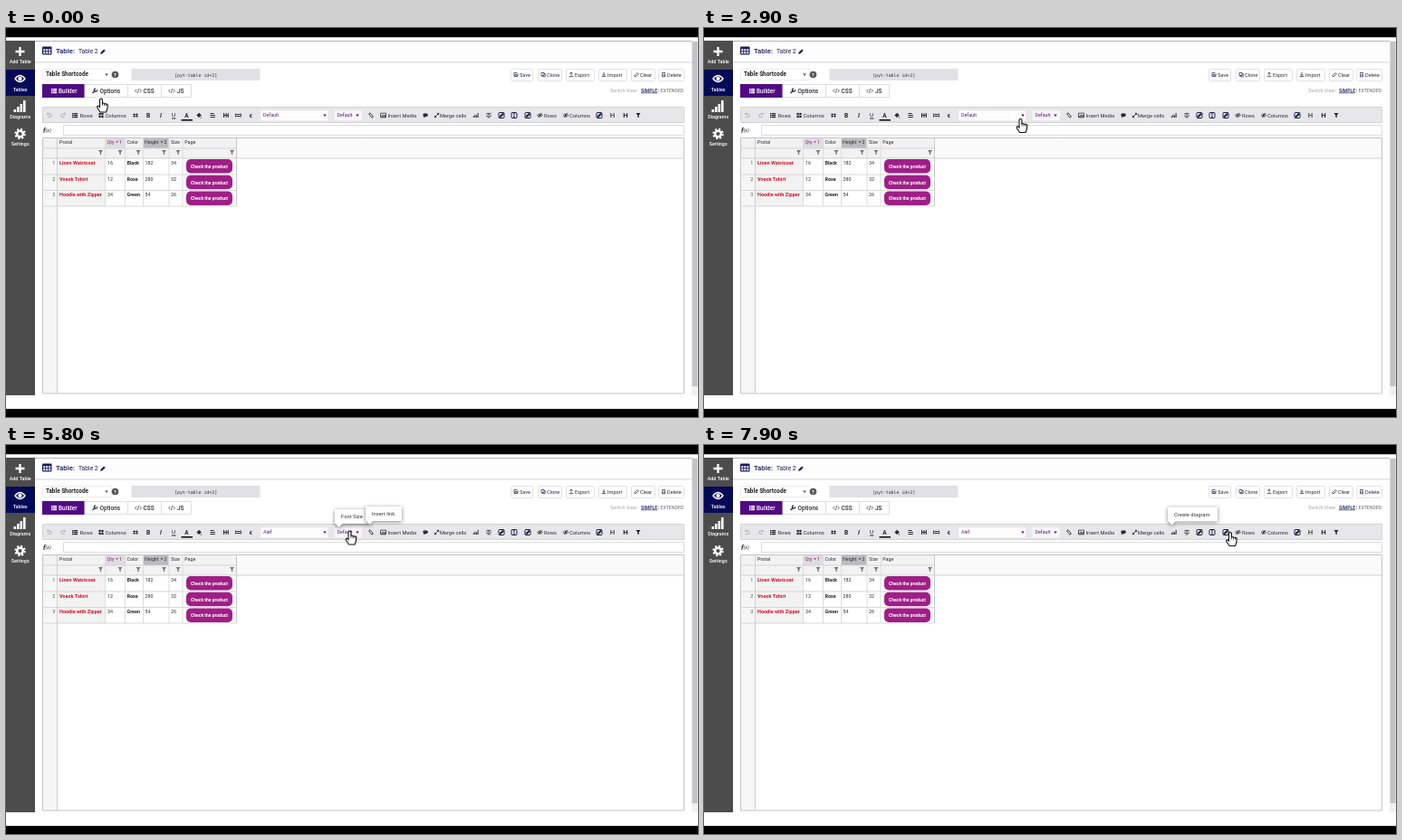
An HTML page with a canvas for the animation above (8 s loop, 764x430 px).

```html
<!DOCTYPE html>
<html lang="en">
<head>
<meta charset="utf-8">
<title>Table builder</title>
<style>
html, body { margin: 0; width: 100%; height: 100%; overflow: hidden; background: #fff; }
canvas { display: block; width: 764px; height: 430px; }
</style>
</head>
<body>
<canvas id="stage"></canvas>
<script>
const W = 764, H = 430, LOOP = 8000;
const canvas = document.getElementById('stage');
const scale = window.devicePixelRatio || 1;
canvas.width = W * scale;
canvas.height = H * scale;

const NAVY = '#1c1f5c', INK = '#2b2b38', PURPLE = '#5b0f80', LINE = '#d0d0d0', GREY = '#f2f2f2';
const FONTS = ['Default', 'ABeeZee', 'Abel', 'Abril Fatface', 'Aclonica', 'Acme', 'Actor', 'Adamina',
  'Advent Pro', 'Aguafina Script', 'Akronim', 'Aladin', 'Aldrich', 'Alef', 'Alegreya', 'Alegreya SC',
  'Alegreya Sans', 'Alegreya Sans SC', 'Alex Brush', 'Alfa Slab One'];
const SIZES = ['Default', ...Array.from({ length: 19 }, (_, i) => String(i + 8))];

// time, x, y of the pointer tip
const PATH = [
  [300, 105, 78], [500, 101, 71], [850, 206, 138], [1200, 166, 112], [1500, 86, 98], [1700, 117, 98],
  [2100, 126, 98], [2900, 349.5, 100.5], [3000, 349.5, 100.5], [3100, 347, 106.5], [3800, 321, 181.5],
  [4000, 320, 188], [4200, 321, 187], [4600, 327, 132], [4700, 327, 132], [5200, 374, 97],
  [5400, 374, 97], [5500, 377, 108], [5600, 399, 97], [5700, 402, 96], [5800, 379.5, 95],
  [6200, 441, 99], [6400, 449.5, 101], [6500, 460, 118], [6600, 463, 97], [6800, 463, 97],
  [7700, 525, 96], [7800, 525, 96], [7900, 581, 96.5]
];

// text, x, y, width, from, to
const TIPS = [
  ['Add row above', 71, 68, 53, 1500, 1900],
  ['Add column left', 99, 68, 55, 2000, 2300],
  ['Font Family', 282, 71, 45, 3100, 4300],
  ['Font Size', 363, 71, 38, 5000, 6000],
  ['Insert link', 397, 68, 40, 5700, 6100],
  ['Comment', 457, 68, 40, 6500, 7000],
  ['Create diagram', 512, 68.5, 55, 7400, 8000]
];

let g;

function rect(x, y, w, h, fill, border, r = 0) {
  g.beginPath();
  g.roundRect(x, y, w, h, r);
  if (fill) { g.fillStyle = fill; g.fill(); }
  if (border) { g.strokeStyle = border; g.lineWidth = 1; g.stroke(); }
}

function text(s, x, y, size = 5.8, color = INK, weight = 400, family = 'Roboto, Inter, sans-serif') {
  g.font = `${weight} ${size}px ${family}`;
  g.textBaseline = 'alphabetic';
  g.fillStyle = color;
  g.fillText(s, x, y + size * 0.36);
}

const bold = (s, x, y, size, color) => text(s, x, y, size, color, 700);

function path(d, x, y, { fill, stroke, width = 1 }) {
  g.save();
  g.translate(x, y);
  const p = new Path2D(d);
  if (fill) { g.fillStyle = fill; g.fill(p); }
  if (stroke) { g.strokeStyle = stroke; g.lineWidth = width; g.stroke(p); }
  g.restore();
}

const draw = (d, x, y, color = INK, width = 0.9) => path(d, x, y, { stroke: color, width });
const solid = (d, x, y, color = INK) => path(d, x, y, { fill: color });
const hline = (x1, x2, y, color = LINE) => rect(x1, y, x2 - x1, 1, color);
const vline = (x, y1, y2, color = LINE) => rect(x, y1, 1, y2 - y1, color);
const caret = (x, y, color = PURPLE) => solid('M-1.8-1H1.8L0 1.4Z', x, y, color);
const funnel = (x, y, color = '#777') => solid('M-2.5-2.5H2.5L.7 0V2.8L-.7 2V0Z', x, y, color);
const eye = (x, y) => {
  draw('M-3 0Q0-3.2 3 0Q0 3.2-3 0ZM-2 2.5L2-2.5', x, y, INK, 0.7);
  solid('M-1-1H1V1H-1Z', x, y);
};
const code = (x, y) => draw('M-1.7-1.8L-3.3 0L-1.7 1.8M1.7-1.8L3.3 0L1.7 1.8M.6-2.4L-.6 2.4', x, y, INK, 0.7);
const pencil = (x, y, color) => solid('M-2.8 2.8L-2.3.8L1.2-2.6L2.7-1.1L-.8 2.4Z', x, y, color);
const grid = (x, y, color) => {
  for (let i = 0; i < 3; i++) {
    rect(x - 3, y - 2.5 + i * 1.9, 1.6, 1.4, color);
    rect(x - 0.9, y - 2.5 + i * 1.9, 4, 1.4, color);
  }
};
const bars = (x, y, k, color) => [2, 4, 3, 6].forEach((h, i) =>
  rect(x + (i * 2 - 4) * k, y + (3 - h) * k, 1.3 * k, h * k, color));

function sidebar() {
  rect(0, 14, 32, 392, '#4c4c4c');
  rect(0, 46, 32, 29, '#050a57');
  draw('M-5 0H5M0-5V5', 15.5, 26, '#fff', 2.3);
  draw('M-5.5 0Q0-7 5.5 0Q0 7-5.5 0Z', 15.5, 56, '#fff', 1.3);
  g.beginPath(); g.arc(15.5, 56, 2.2, 0, 7); g.fillStyle = '#fff'; g.fill();
  [3, 6, 9, 13].forEach((h, i) => rect(8.5 + i * 3.5, 93 - h, 2.6, h, '#fff'));
  g.strokeStyle = '#fff';
  g.lineWidth = 2.4;
  g.beginPath(); g.arc(15.5, 117, 3.3, 0, 7); g.stroke();
  g.setLineDash([2, 1.93]);
  g.beginPath(); g.arc(15.5, 117, 5, 0, 7); g.stroke();
  g.setLineDash([]);
  g.textAlign = 'center';
  [['Add Table', 37.5], ['Tables', 68.5], ['Diagrams', 98.5], ['Settings', 128.5]]
    .forEach(([s, y]) => text(s, 15.7, y, 5.4, '#fff', 500));
  g.textAlign = 'left';
}

function header() {
  rect(32, 14, 725, 24, '#fdfdfe');
  hline(0, 757, 14, '#b5b5b5');
  hline(32, 757, 37.5, '#d4d4da');
  rect(40, 20.5, 10.5, 9, NAVY, null, 1);
  for (let r = 0; r < 2; r++)
    for (let c = 0; c < 3; c++) rect(41.2 + c * 3, 23.3 + r * 3, 2.1, 2, '#fff');
  text('Table:', 55, 25.5, 7.8, NAVY, 500);
  text('Table 2', 80, 26, 6.7, NAVY);
  pencil(107, 26, NAVY);

  rect(40.5, 45.5, 76, 12, '#fff', '#ececec');
  bold('Table Shortcode', 44, 51, 6.4, '#222');
  caret(111, 51.5, '#555');
  g.beginPath(); g.arc(120.5, 51.5, 3.8, 0, 7); g.fillStyle = '#555'; g.fill();
  bold('?', 119, 51.5, 5.6, '#fff');
  rect(138.5, 45, 142, 13, '#e1e1e3');
  text('[pyt-table id=2]', 186, 51.8, 4.9, INK, 400, '"DejaVu Sans Mono", monospace');

  [['Save', 557, 25], ['Clone', 587, 27], ['Export', 618, 32], ['Import', 654, 32], ['Clear', 690, 27], ['Delete', 720, 29]]
    .forEach(([s, x, w], i) => {
      rect(x + 0.5, 45.5, w - 1, 13, '#fff', '#e2e2e6', 1);
      const d = ['M-2-2H1L2-1V2H-2ZM-1 2V0H1V2', 'M-2-2H1V1H-2ZM-1 1V2.3H2.2V-1H1', 'M-2.3 2H2.3M0 1V-2.5M-1.5-1L0-2.5L1.5-1',
        'M-2.3 2H2.3M0-2.5V1M-1.5-.5L0 1L1.5-.5', 'M-2.5 1.5L1-2L2.5-.5L-1 2.3Z', 'M-2-2H2M-1.5-1V2.3H1.5V-1M0-1V2'][i];
      draw(d, x + 6, 51.5, NAVY, 0.7);
      text(s, x + 10, 51.5, 5.6, INK);
    });

  rect(87, 62.5, 117.5, 14, '#fff', '#dfdfe3');
  rect(40, 62, 46.5, 15, '#510a83');
  vline(134, 63, 76, '#dfdfe3');
  vline(171, 63, 76, '#dfdfe3');
  grid(53, 69.5, '#fff');
  text('Builder', 58, 69.5, 6.5, '#fff', 500);
  draw('M-2.5 2.5L.8-.8', 98, 69.5, INK, 1.3);
  draw('M2.4-1.4A1.7 1.7 0 1 1 .8-2.6', 98.2, 69.5, INK, 1.1);
  text('Options', 103.5, 69.5, 6.5, INK, 500);
  code(146, 69.5);
  text('CSS', 151.5, 69.5, 6.5, INK, 500);
  code(183, 69.5);
  text('JS', 189, 69.5, 6.5, INK, 500);

  text('Switch View:', 667, 69, 5.5, '#a5a5ad');
  text('SIMPLE', 701, 69, 5.2, NAVY, 500);
  rect(701, 71.5, 18, 0.7, NAVY);
  text('| EXTENDED', 720, 69, 5.2, '#666');
}

function toolbar(font) {
  rect(40.5, 87.5, 708, 17, '#e7e7e9', '#d3d3d6');
  const y = 96.5;
  draw('M-2.5-1.5H.8A1.8 1.8 0 0 1 .8 2H-1.5M-1-3L-2.5-1.5L-1 0', 48, y, '#aaa');
  draw('M2.5-1.5H-.8A1.8 1.8 0 0 0-.8 2H1.5M1-3L2.5-1.5L1 0', 63, y, '#aaa');
  grid(76, y, INK);
  text('Rows', 81.5, y, 5.8);
  [[-2.6, -2.6], [0.3, -2.6], [-2.6, 0.3], [0.3, 0.3]].forEach(([dx, dy]) => rect(105 + dx, y + dy, 2.3, 2.3, INK));
  text('Columns', 109.5, y, 5.9);
  draw('M-2.8-1H2.8M-2.8 1.2H2.8M-1.5-2V2M1.5-2V2', 143, y);
  bold('B', 155, y, 6.6, '#222');
  text('I', 170, y, 6.6, '#222', 'italic 700');
  text('U', 183, y - 0.4, 6.2, '#222');
  hline(183, 187.4, 99.5, '#222');
  bold('A', 197.3, y - 0.2, 6.4, '#222');
  rect(193.5, 101, 12.5, 1.6, '#111');
  solid('M-2.6 0L.2-2.8L2.8 0L0 2.6ZM2.2 1.5L3.3 3H1.8Z', 213, y);
  draw('M-2.5-2H1.5M-2.5 0H2.8M-2.5 2H2.8', 228, y, INK, 1.1);
  draw('M-2.5-2.5V2.5M0-2.5V2.5M2.3-2.5V2.5M-2.5 0H2.3', 243, y, INK, 1);
  draw('M-2.8-2V2M2.8-2V2M-2-1H2M-2 1H2', 256.5, y, INK, 1);
  bold('€', 268.5, y, 6, '#222');

  rect(281, 91, 74.5, 11.5, '#fdfdfe', '#ececf0');
  text(font, 284, y, 5.3, PURPLE);
  caret(352, y);
  rect(362.5, 91, 30.5, 11.5, '#f7f7f9', '#ececf0');
  text('Default', 365.5, y, 5.3, PURPLE);
  caret(388, y);

  draw('M-.5.5L-2-.7A1 1 0 0 1-.7-2.2L.8-1M.5-.5L2 .7A1 1 0 0 1 .7 2.2L-.8 1', 403, y, INK, 1);
  draw('M-3-2.3H3V2.3H-3ZM-2 1.5L-.5-.4L.5.6L1.4-.4L2.3 1.5Z', 416.5, y, INK, 0.8);
  text('Insert Media', 421.5, y, 5.7);
  solid('M-2.9-.4Q-2.7-2.3 0-2.3Q2.9-2.2 2.9-.2Q2.7 1.8 0 1.8L-2.3 2.7L-1.8 1.2Z', 463, y);
  draw('M-2.2 2.2L2.2-2.2M.3-2.2H2.2V-.3M-.3 2.2H-2.2V.3', 475.5, y);
  text('Merge cells', 479, y, 5.7);
  bars(519, y, 0.8, INK);
  draw('M-2.8-1.8H2.8M0-2.8V2.3M-1.5 2.3H1.5M-3 .6H-1M1 .6H3', 533, y, INK, 0.8);
  [547, 561, 576, 655].forEach((x, i) => {
    rect(x - 3, y - 3, 6, 6, null, NAVY, 0.8);
    if (i === 1) draw('M0-1.8V1.8M-1-1.8H1M-1 1.8H1', x, y, INK, 0.8);
    else pencil(x + 0.3, y - 0.2, INK);
  });
  eye(589.5, y);
  text('Rows', 594, y, 5.7);
  eye(618, y);
  text('Columns', 622, y, 5.8);
  draw('M-1.7-2.5V2.5M1.7-2.5V2.5M-1 0H1', 669.5, y);
  draw('M-1.7-2.5V2.5M1.7-2.5V2.5M-1.7 0H1.7', 684, y, INK, 1.1);
  funnel(698, y, '#222');

  text('f', 41, 113, 7, '#222', 'italic 700');
  text('(x)', 43.6, 113, 5.3, '#222', 'italic 400');
  rect(63.5, 107.5, 685, 11, '#fff', '#dcdcdc');
}

function table() {
  rect(40, 121, 709, 283, '#fff');
  rect(40, 121, 709, 23, '#fafafa');
  rect(40, 121, 214, 23, GREY);
  rect(40, 144, 16, 260, '#f6f6f6');
  rect(56, 144, 53, 53, GREY);
  rect(109, 121, 22, 12, '#dedee0');
  rect(151, 121, 28.5, 12, '#bcbcbe');
  rect(40.5, 121.5, 708, 282.5, null, '#c4c4c8');
  hline(40, 254, 132.5, '#d8d8d8');
  hline(40, 749, 143.5, '#d2d2d2');
  [161.5, 179, 196.5].forEach(y => hline(40, 254, y, '#d8d8d8'));
  vline(56, 121, 404, '#cfcfcf');
  [109, 131, 151, 179.5, 194.5].forEach(x => vline(x, 121, 197, '#dcdcdc'));
  vline(254, 121, 197, '#c8c8c8');

  text('Protal', 59, 126.3, 5.4);
  text('Qty', 111.5, 126, 5.3, '#8a1a7c');
  solid('M-1.3-.8H1.3L0 1.1Z', 122.5, 126, '#8a1a7c');
  text('1', 125, 126, 5.3, '#8a1a7c');
  text('Color', 133.5, 126, 5.3);
  text('Height', 153, 126, 5.3);
  solid('M-1.3-.8H1.3L0 1.1Z', 172, 126);
  text('2', 174.5, 126, 5.3);
  text('Size', 182, 126, 5.3);
  text('Page', 197.3, 126, 5.3);
  [104.5, 126, 146, 174.5, 190, 249.5].forEach(x => funnel(x, 137.5));

  [['Linen Waistcoat', 16, 'Black', 182, 34], ['Vneck Tshirt', 12, 'Rose', 280, 32], ['Hoodie with Zipper', 34, 'Green', 54, 26]]
    .forEach(([name, qty, color, height, size], i) => {
      const y = 148.8 + i * 17.8;
      text('⁝', 43.5, y, 5, '#777');
      text(String(i + 1), 51.3, y, 5.3, '#555');
      bold(name, 59, y, 5.5, '#d01022');
      text(String(qty), 112, y, 5.3);
      bold(color, 133.5, y, 5.4, '#222');
      text(String(height), 153.5, y, 5.3);
      text(String(size), 182, y, 5.3);
      rect(199, y - 3.8, 51, 15.4, '#9f1f86', null, 5);
      bold('Check the product', 204, y + 4.2, 5, '#fff');
    });
}

function page(font) {
  rect(0, 0, W, H, '#fff');
  header();
  sidebar();
  toolbar(font);
  table();
  rect(757, 14, 7, 392, '#f1f1f1');
  rect(757.5, 15, 6, 381, '#c3c3c5');
  rect(0, 0, W, 10.3, '#000');
  rect(0, 421, W, 9, '#000');
}

function shadow(blur, dy, alpha) {
  g.shadowColor = `rgba(0,0,0,${alpha})`;
  g.shadowBlur = blur * scale;
  g.shadowOffsetY = dy * scale;
}

function tooltip([label, x, y, w, from, to], t) {
  if (t < from || t >= to) return;
  g.save();
  g.globalAlpha = Math.min(1, (t - from + 100) / 200);
  shadow(4, 1, 0.5);
  g.beginPath();
  g.moveTo(x, y);
  g.lineTo(x + w, y);
  g.lineTo(x + w, y + 16);
  g.lineTo(x + 8.5, y + 16);
  g.lineTo(x + 4.5, y + 20);
  g.lineTo(x + 1, y + 16);
  g.lineTo(x, y + 16);
  g.closePath();
  g.fillStyle = '#fff';
  g.fill();
  shadow(0, 0, 0);
  text(label, x + 7, y + 8.2, 5.8, '#333');
  g.restore();
}

function dropdown(items, x, w, tipY) {
  const step = 6.56, top = 101;
  g.save();
  shadow(16, 5, 0.3);
  rect(x, top, w, 131.5, '#fff');
  g.restore();
  rect(x + 0.5, top + 0.5, w - 1, 131, '#fff', '#8c8c92');
  const pick = Math.max(0, Math.min(items.length - 1, Math.floor((tipY - top + 0.2) / step)));
  rect(x + 1, top + pick * step, w - 7, step, '#1584e8');
  items.forEach((s, i) => text(s, x + 3.5, 104.2 + i * step, 5.1, i === pick ? '#fff' : PURPLE));
  rect(x + w - 6.5, top + 1, 5.5, 130, '#f1f1f1');
  rect(x + w - 6, 108, 4.5, 7, '#bdbdc0');
  solid('M-1.4 1H1.4L0-1Z', x + w - 3.7, 104.5, '#666');
  solid('M-1.4-1H1.4L0 1Z', x + w - 3.7, 228.5, '#444');
}

function pointerAt(t) {
  const i = PATH.findIndex(k => k[0] > t);
  if (i === 0) return PATH[0].slice(1);
  if (i < 0) return PATH[PATH.length - 1].slice(1);
  const [t0, x0, y0] = PATH[i - 1], [t1, x1, y1] = PATH[i];
  const p = (t - t0) / (t1 - t0);
  return [x0 + (x1 - x0) * p, y0 + (y1 - y0) * p];
}

function pointer(x, y) {
  const arrow = 'M0 0V11.3L2.7 8.8L4.6 13L6.5 12.2L4.7 8.2H8.2Z';
  const hand = 'M-1.5 1Q0-1 1.4 1V5.2Q3-.2+4.6 3.4 5.6Q7.3 5.6 7.3 7.6L6.8 11.5L5.5 15H-.8L-4 10.6Q-4.8 8.4-3.2 8.2L-1.5 9.6Z'
    .replace('Q3-.2+4.6 3.4 5.6', 'Q2.5 4.6 3.4 5.6');
  path(y > 106 ? arrow : hand, x, y, { fill: '#fff', stroke: '#111', width: 1.1 });
  if (y <= 106) draw('M1.4 5.5V8M3.5 6V8.2M5.5 6.3V8.4', x, y, '#111', 0.7);
}

function cached(font) {
  const c = document.createElement('canvas');
  c.width = canvas.width;
  c.height = canvas.height;
  g = c.getContext('2d');
  g.scale(scale, scale);
  page(font);
  return c;
}

const before = cached('Default'), after = cached('Alef');
const ctx = canvas.getContext('2d');
g = ctx;
const start = performance.now();

function frame() {
  const t = Math.floor(((performance.now() - start) % LOOP) / 100) * 100;
  const [x, y] = pointerAt(t);
  g.setTransform(1, 0, 0, 1, 0, 0);
  g.drawImage(t < 4200 ? before : after, 0, 0);
  g.setTransform(scale, 0, 0, scale, 0, 0);
  TIPS.forEach(tip => tooltip(tip, t));
  if (t >= 3000 && t < 4200) dropdown(FONTS, 281, 74, y);
  if (t >= 5400 && t < 5600) dropdown(SIZES, 362, 31, y);
  pointer(x, y);
  requestAnimationFrame(frame);
}
frame();
</script>
</body>
</html>
```
